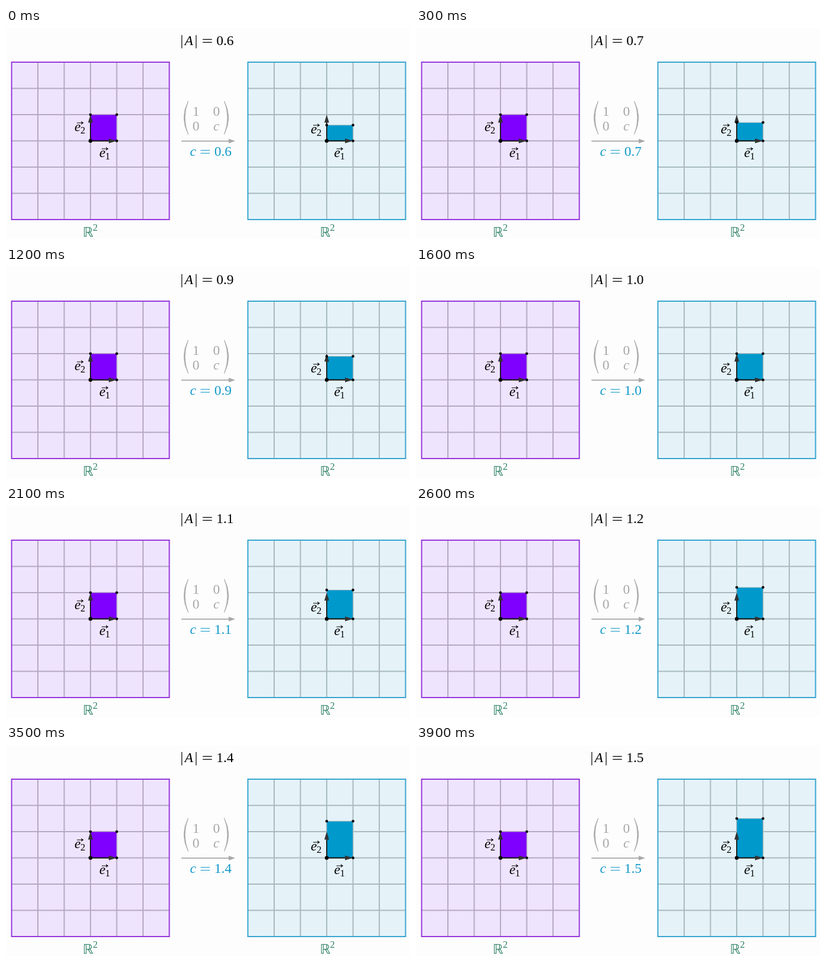
These frames come from a looping animation (684 px wide and 358 px high, 4.2 s). An HTML page:

```html
<!DOCTYPE html>
<html lang="en">
<head>
<meta charset="utf-8">
<title>Determinant as area scale</title>
<style>
html, body { margin: 0; width: 100%; height: 100%; overflow: hidden; background: #fdfdfd; }
svg { display: block; width: 684px; height: 358px; }
text { font: 23.4px "Liberation Serif", "Noto Serif", serif; }
.it { font-style: italic; }
.small { font-size: 16.5px; }
.set { font: 22.5px "DejaVu Sans", sans-serif; }
.green { fill: #2d8264; }
.blue { fill: #1199c9; color: #1199c9; }
.gray { fill: #a8a8a8; color: #a8a8a8; }
.rule { fill: none; stroke: currentColor; stroke-width: 1.2; }
</style>
</head>
<body>
<svg viewBox="0 0 684 358">
  <g id="planes"></g>
  <g>
    <path class="rule" d="M297.7 12V34.5M321.9 12V34.5M333 19.3h15.6M333 24.3h15.6"/>
    <text class="it" x="302.5" y="28.8">A</text>
    <text class="value" x="356.2" y="28.8"></text>
  </g>
  <g class="gray">
    <path d="M308.5 124Q294 152 308.5 180.500Q297.500 152 308.500 124ZM369.500 124Q384 152 369.500 180.500Q380.500 152 369.500 124Z" stroke="currentColor" stroke-width=".8"/>
    <g text-anchor="middle">
      <text x="321.500" y="148.500">1</text>
      <text x="356.300" y="148.500">0</text>
      <text x="321.500" y="174">0</text>
      <text class="it" x="356.300" y="174">c</text>
    </g>
    <path d="M297 190.900H377V187.900L388 191.800L377 195.700V192.700H297Z"/>
  </g>
  <g class="blue">
    <text class="it" x="311.500" y="217">c</text>
    <path class="rule" d="M329.500 207.500h15.600M329.500 212.500h15.600"/>
    <text class="value" x="352.800" y="217"></text>
  </g>
</svg>
<script>
const UNIT = 44.5, OY = 191.5, LOOP = 4200;
const STARTS = [0, 300, 700, 1200, 1600, 2100, 2600, 3000, 3500, 3900];

const dot = (x, y, r = 2.3, name = "") => `<circle class="${name}" cx="${x}" cy="${y}" r="${r}"/>`;

function vectorLabel(x, y, index) {
  return `<text class="it" x="${x}" y="${y}">e</text>
    <text class="small" x="${x + 10}" y="${y + 3.500}">${index}</text>
    <path class="rule" d="M${x + 4} ${y - 14}h11m-3.500 -2.500q1 2 3.500 2.500q-2.500 .5 -3.500 2.500"/>`;
}

function plane(ox, c) {
  const half = 3 * UNIT, left = ox - half, top = OY - half;
  let lines = "";
  for (let i = 1; i < 6; i++) {
    lines += `M${left + i * UNIT} ${top}v${2 * half}M${left} ${top + i * UNIT}h${2 * half}`;
  }
  const arrow = `<path d="M0 0H33" stroke="#111" stroke-width="1.8"/>
    <path d="M31 -4L44.500 0L31 4Z" fill="#333"/>`;
  return `<rect x="${left}" y="${top}" width="${2 * half}" height="${2 * half}" fill="${c.pale}"/>
    <path d="${lines}" stroke="${c.grid}" stroke-width="2"/>
    <rect x="${left}" y="${top}" width="${2 * half}" height="${2 * half}" fill="none" stroke="${c.edge}" stroke-width="2"/>
    <rect class="${c.name} area" x="${ox}" y="${OY - UNIT}" width="${UNIT}" height="${UNIT}" fill="${c.full}" stroke="${c.grid}"/>
    <g transform="translate(${ox} ${OY})">${arrow}<g transform="rotate(-90)">${arrow}</g></g>
    ${dot(ox, OY, 3.200)}${dot(ox + UNIT, OY)}
    ${[ox, ox + UNIT].map(x => dot(x, OY - UNIT, 2.3, c.name + " corner")).join("")}
    ${vectorLabel(ox + c.e1, 219, 1)}${vectorLabel(ox - 27, c.e2, 2)}
    <text class="set green" x="${ox + c.set}" y="353.500">ℝ</text>
    <text class="small green" x="${ox + c.set + 17}" y="344">2</text>`;
}

document.getElementById("planes").innerHTML =
  plane(143, { name: "fixed", pale: "#efe4fd", grid: "#b5a9c4", edge: "#9538dc", full: "#7f00ff", e1: 15, e2: 175, set: -13 }) +
  plane(543, { name: "scaled", pale: "#e5f3f9", grid: "#a9babf", edge: "#38a5cf", full: "#0099cc", e1: 12.500, e2: 179, set: -11.500 });

const values = document.querySelectorAll(".value");
const area = document.querySelector(".scaled.area");
const corners = document.querySelectorAll(".scaled.corner");

function draw(now) {
  const t = now % LOOP;
  const step = STARTS.filter(s => s <= t).length - 1;
  const c = (6 + step) / 10, top = OY - c * UNIT;
  values.forEach(v => v.textContent = c.toFixed(1));
  area.setAttribute("y", top);
  area.setAttribute("height", c * UNIT);
  corners.forEach(p => p.setAttribute("cy", top));
}

const start = performance.now();
function tick() {
  draw(performance.now() - start);
  requestAnimationFrame(tick);
}
tick();
</script>
</body>
</html>
```
